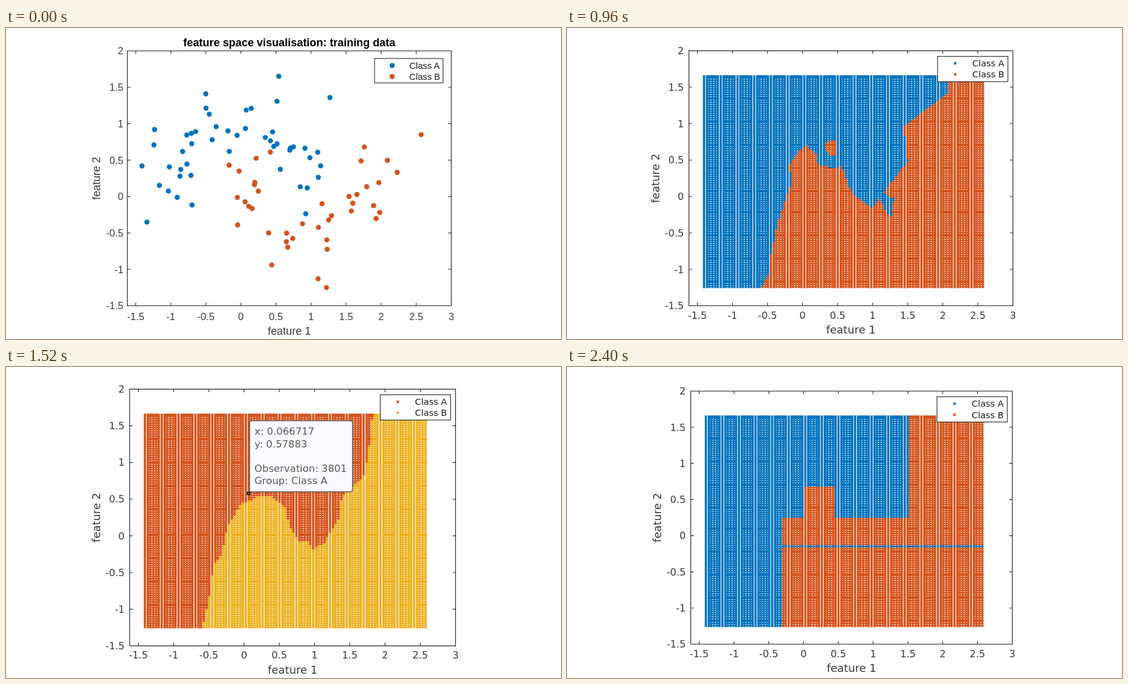
Write an HTML page with a canvas that moves like this. It is 908x510 px and loops after 2480 ms.

```html
<!DOCTYPE html>
<html lang="en">
<head>
<meta charset="utf-8">
<title>Classifier comparison</title>
<style>
  html, body { margin: 0; width: 100%; height: 100%; overflow: hidden; background: #fff; }
  .scene { position: absolute; left: 0; top: 0; width: 908px; height: 510px; overflow: hidden; background: #fff; }
  .scene canvas, .scene svg { position: absolute; }
  .scene svg { left: 0; top: 0; }
</style>
</head>
<body>
<script>
const BLUE = "#0072bd", ORANGE = "#d5521a", YELLOW = "#edb120", LINE = "#262626", INK = "#383838";
const LOOP = 2480, SCENE = 640;
const AREA = { left: -1.406, right: 2.57, bottom: -1.245, top: 1.65 };

// Label metrics: text sizes and distances from the axes box
const plain = { font: "'Liberation Sans', Arial, sans-serif", tick: 16.3, label: 17.9, key: 14.7,
  below: 23, beside: 6.5, xLabel: 47.5, yLabel: 44.5, inset: [13.5, 12.5], keyBox: [112, 40] };
const wide = { font: "'DejaVu Sans', Verdana, sans-serif", tick: 16, label: 17.8, key: 14.4,
  below: 21.1, beside: 8.3, xLabel: 45.6, yLabel: 48.6, inset: [8.2, 9.2], keyBox: [115, 41.5] };

// Two noisy half moons plus a few outliers, in data units
let seed = 2718;
const random = () => (seed = seed * 16807 % 2147483647) / 2147483647;
const noise = () => (random() + random() + random() - 1.5) * 0.34;
const moon = (count, curve) => Array.from({ length: count }, (_, i) =>
  curve(Math.PI * i / (count - 1)).map(v => v + noise()));
const classA = [[0.54, 1.65], [1.27, 1.36], [-0.5, 1.41], [-1.23, 0.92], [-1.41, 0.42], [-1.34, -0.35],
  ...moon(43, t => [Math.cos(t), Math.sin(t)])];
const classB = [[2.57, 0.85], [1.76, 0.68], [0.42, 0.61], [1.22, -1.25], [1.1, -1.13], [0.44, -0.94],
  ...moon(35, t => [1 - Math.cos(t), 0.5 - Math.sin(t)])];

const inside = points => (x, y) => points.reduce((odd, [x1, y1], i) => {
  const [x2, y2] = points.at(i - 1);
  return (y1 > y) !== (y2 > y) && x < x1 + (y - y1) * (x2 - x1) / (y2 - y1) ? !odd : odd;
}, false);
const rightOf = boundary => inside([[-0.6, -2], ...boundary, [3, 1.7], [3, -2]]);

const ragged = rightOf([[-0.58, -1.26], [-0.48, -1.05], [-0.46, -0.83], [-0.34, -0.32], [-0.16, 0.18],
  [-0.16, 0.33], [-0.22, 0.39], [-0.06, 0.62], [0.06, 0.7], [0.2, 0.57], [0.2, 0.45], [0.44, 0.39],
  [0.56, 0.41], [0.69, 0.07], [0.98, -0.17], [1.1, -0.04], [1.25, -0.3], [1.31, -0.03], [1.15, 0.05],
  [1.5, 0.48], [1.44, 0.96], [2.06, 1.41], [2.08, 1.7]]);
const island = inside([[0.32, 0.69], [0.37, 0.77], [0.48, 0.77], [0.48, 0.55], [0.37, 0.55]]);
const smooth = rightOf([[-0.59, -1.27], [-0.49, -0.82], [-0.43, -0.38], [-0.34, -0.32], [-0.23, 0.14],
  [-0.04, 0.43], [0.25, 0.55], [0.37, 0.54], [0.59, 0.39], [0.64, 0.12], [0.77, -0.06], [0.92, -0.06],
  [0.96, -0.21], [1.14, -0.09], [1.37, 0.28], [1.38, 0.54], [1.69, 0.8], [1.76, 1.1], [1.83, 1.7]]);
const steps = (x, y) => x > -0.31 && Math.abs(y + 0.143) > 0.0145 &&
  (y < 0.25 || x > 1.51 || (x > 0.01 && x < 0.45 && y < 0.69));

const scenes = [
  { box: [198.5, 37.5, 728.5, 455.5], zero: 384.3, theme: plain, colors: [BLUE, ORANGE],
    title: "feature space visualisation: training data" },
  { box: [199.5, 37.3, 729.5, 455.5], zero: 385.4, theme: wide, colors: [BLUE, ORANGE],
    region: (x, y) => ragged(x, y) || island(x, y) },
  { box: [202.3, 36.3, 735.5, 457.3], zero: 389.5, theme: wide, colors: [ORANGE, YELLOW],
    region: smooth, tip: true },
  { box: [202.5, 39.5, 728.5, 454.5], zero: 387, theme: wide, colors: [BLUE, ORANGE], region: steps }
];
for (const scene of scenes) {
  const [, top, right, bottom] = scene.box;
  scene.toX = v => scene.zero + v * (right - scene.zero) / 3;
  scene.toY = v => top + (2 - v) * (bottom - top) / 3.5;
}

const text = (x, y, size, str, extra = "") =>
  `<text x="${x}" y="${y}" font-size="${size}" ${extra}>${str}</text>`;
const rect = (x, y, w, h, extra) => `<rect x="${x}" y="${y}" width="${w}" height="${h}" ${extra}/>`;
const dot = (x, y, fill) => `<circle cx="${x}" cy="${y}" r="4.2" fill="${fill}"/>`;
const halves = (from, to) => Array.from({ length: (to - from) * 2 + 1 }, (_, i) => from + i / 2);
const MIDDLE = 'text-anchor="middle"', END = 'text-anchor="end"';

function axes({ box: [l, t, r, b], toX, toY, theme, title }) {
  const centerX = (l + r) / 2, centerY = (t + b) / 2;
  let path = `M${l} ${t}H${r}V${b}H${l}Z`, out = "";
  for (const v of halves(-1.5, 3)) {
    path += `M${toX(v)} ${b}v-5M${toX(v)} ${t}v5`;
    out += text(toX(v), b + theme.below, theme.tick, v, MIDDLE);
  }
  for (const v of halves(-1.5, 2)) {
    path += `M${l} ${toY(v)}h5M${r} ${toY(v)}h-5`;
    out += text(l - theme.beside, toY(v) + theme.tick * 0.36, theme.tick, v, END);
  }
  out += text(centerX, b + theme.xLabel, theme.label, "feature 1", MIDDLE);
  out += text(0, 0, theme.label, "feature 2",
    `${MIDDLE} transform="translate(${l - theme.yLabel} ${centerY}) rotate(-90)"`);
  if (title) out += text(centerX, t - 8, theme.label, title, `${MIDDLE} font-weight="bold" fill="#000"`);
  return `<path d="${path}" fill="none" stroke="${LINE}" stroke-width="1.15"/>` + out;
}

function legend({ box: [, t, r], theme, colors, region }) {
  const [width, height] = theme.keyBox;
  const x = r - theme.inset[0] - width, y = t + theme.inset[1];
  return rect(x, y, width, height, `fill="#fff" stroke="${LINE}" stroke-width="1.1"`) +
    ["Class A", "Class B"].map((name, i) => {
      const row = y + 11.5 + i * 18.1, mark = x + 28.8;
      const sign = region ? rect(mark - 2, row - 2, 4, 4, `rx="0.8" fill="${colors[i]}"`)
                          : dot(mark, row, colors[i]);
      return sign + text(x + 56.8, row + theme.key * 0.365, theme.key, name, 'fill="#1a1a1a"');
    }).join("");
}

const scatter = ({ toX, toY, colors }) => [classA, classB].map((points, i) =>
  points.map(([x, y]) => dot(toX(x), toY(y), colors[i])).join("")).join("");

function dataTip({ toX, toY }) {
  const x = toX(0.066717), y = toY(0.57883);
  const lines = ["x: 0.066717", "y: 0.57883", "", "Observation: 3801", "Group: Class A"];
  return `<path d="M${x + 1.3} ${y - 2.7}v-112.5q0-4 4-4h160.5q4 0 4 4v108.5q0 4-4 4Z"
      fill="#fafaff" stroke="#4a4a4a" stroke-width="1.3"/>` +
    lines.map((s, i) => text(x + 9.3, y - 96 + i * 20.3, 16.3, s, 'fill="#595959"')).join("") +
    rect(x - 3, y - 2.7, 5.5, 5.5, 'fill="#111"') + rect(x - 1, y - 0.7, 1.5, 1.5, 'fill="#ddd"');
}

// 101 x 101 hard-edged markers on a coarse raster; enlarging it gives the moire pattern
function markerGrid({ toX, toY, region, colors }) {
  const stepX = 23 / 6, pad = 3.5, radius = 1.7;
  const left = toX(AREA.left), top = toY(AREA.top);
  const scale = (toX(AREA.right) - left) / 100 / stepX;
  const stepY = (toY(AREA.bottom) - top) / 100 / scale;
  const canvas = document.createElement("canvas");
  canvas.width = Math.ceil(100 * stepX + 2 * pad);
  canvas.height = Math.ceil(100 * stepY + 2 * pad);
  canvas.style.cssText = `left:${left - pad * scale}px;top:${top - pad * scale}px;` +
    `width:${canvas.width * scale}px;height:${canvas.height * scale}px`;
  const ctx = canvas.getContext("2d");

  function marker(u, v) {
    for (let px = Math.ceil(u - radius - 0.5); px + 0.5 <= u + radius; px++) {
      const half = Math.abs(px + 0.5 - u) < 1.3 ? 1.55 : 1;
      const first = Math.ceil(v - half - 0.5), last = Math.floor(v + half - 0.5);
      ctx.fillRect(px, first, 1, last - first + 1);
    }
  }
  colors.forEach((color, group) => {
    ctx.fillStyle = color;
    for (let i = 0; i <= 100; i++) for (let j = 0; j <= 100; j++) {
      const x = AREA.left + (AREA.right - AREA.left) * i / 100;
      const y = AREA.top - (AREA.top - AREA.bottom) * j / 100;
      if (region(x, y) === (group === 1)) marker(i * stepX + pad, j * stepY + pad);
    }
  });
  return canvas;
}

const layers = scenes.map(scene => {
  const layer = document.createElement("div");
  layer.className = "scene";
  layer.innerHTML = `<svg width="908" height="510" viewBox="0 0 908 510" fill="${INK}"
    font-family="${scene.theme.font}">${axes(scene)}${scene.region ? "" : scatter(scene)}${
    legend(scene)}${scene.tip ? dataTip(scene) : ""}</svg>`;
  if (scene.region) layer.prepend(markerGrid(scene));
  document.body.append(layer);
  return layer;
});

function render(time) {
  const current = Math.floor((time % LOOP) / SCENE);
  layers.forEach((layer, i) => layer.style.visibility = i === current ? "visible" : "hidden");
}

const start = performance.now();
function tick() {
  render(performance.now() - start);
  requestAnimationFrame(tick);
}
tick();
</script>
</body>
</html>
```
